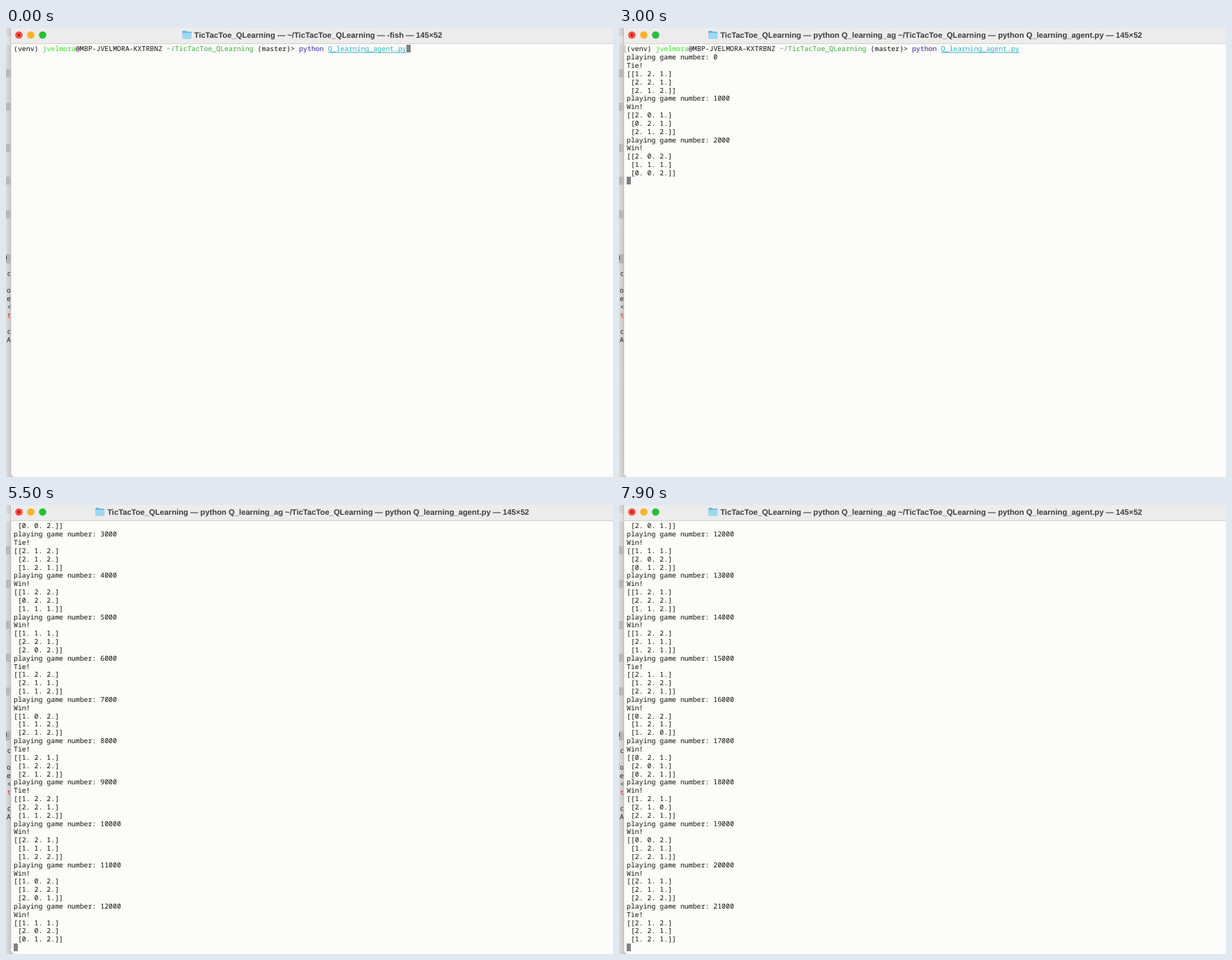
Recreate the animation shown at these times as an HTML page with a canvas. Size 870 px wide and 643 px high, loop 8 s.

```html
<!DOCTYPE html>
<html lang="en">
<head>
<meta charset="utf-8">
<title>Terminal</title>
<style>
  html, body { margin: 0; width: 100%; height: 100%; overflow: hidden; background: #fcfcfb; }
  canvas { display: block; width: 870px; height: 643px; }
</style>
</head>
<body>
<canvas id="stage" width="870" height="643"></canvas>
<script>
const W = 870, H = 643, LOOP = 8000;
const ctx = document.getElementById('stage').getContext('2d');

const MONO = '500 9.877px "Noto Sans Mono", "DejaVu Sans Mono", monospace';
const TITLE = 'bold 11.22px "Liberation Sans", Arial, sans-serif';
const COL = 5.926, ROW = 11.84, LEFT = 11, BASE = 33.3, ROWS = 52;

// Times in ms
const ENTER = 2100, RETITLE = 2200, FIRST_GAME = 2285, GAME_STEP = 260;

const PROMPT = [
  ['(venv) ', '#111'],
  ['jvelmora', '#35e01f'],
  ['@MBP-JVELMORA-KXTRBNZ ', '#111'],
  ['~/TicTacToe_QLearning', '#38ad31'],
  [' (master)> ', '#111'],
  ['python ', '#3a249c'],
  ['Q_learning_agent.py', '#2fb0c0', true]
];
const PROMPT_COLS = PROMPT.reduce((n, [text]) => n + text.length, 0);

const IDLE_TITLE = 'TicTacToe_QLearning — ~/TicTacToe_QLearning — -fish — 145×52';
const BUSY_TITLE = 'TicTacToe_QLearning — python Q_learning_ag ~/TicTacToe_QLearning — python Q_learning_agent.py — 145×52';

// Result letter followed by the three board rows
const GAMES = `T121221212 W201021212 W202111002 T212212121 W122022111 W111221202
  T122211112 W102112212 T121122212 T122221112 W221111122 W102122201 W111202012
  W121222112 W122211121 T211122221 W022121120 W021201021 W121210221 W002121221
  W211211222 T212221121`.split(/\s+/);

const boardRow = digits => '[' + [...digits].map(d => d + '.').join(' ') + ']';

const OUTPUT = GAMES.flatMap((game, i) => [
  'playing game number: ' + i * 1000,
  game[0] === 'T' ? 'Tie!' : 'Win!',
  '[' + boardRow(game.slice(1, 4)),
  ' ' + boardRow(game.slice(4, 7)),
  ' ' + boardRow(game.slice(7)) + ']'
]);

function rect(x, y, w, h, color) {
  ctx.fillStyle = color;
  ctx.fillRect(x, y, w, h);
}

function disc(x, y, r, color) {
  ctx.fillStyle = color;
  ctx.beginPath();
  ctx.arc(x, y, r, 0, 2 * Math.PI);
  ctx.fill();
}

function type(text, x, y, color) {
  ctx.fillStyle = color;
  ctx.fillText(text, x, y);
}

const baseline = row => Math.round(BASE + row * ROW);

function drawBackdrop() {
  const shade = ctx.createLinearGradient(0, 0, 8, 0);
  shade.addColorStop(0, '#dcdcdd');
  shade.addColorStop(1, '#c6c6c8');
  rect(0, 0, 16, H, shade);
  rect(0, 12, 7, 12, 'rgba(255,255,255,.3)');
  for (const y of [59, 107, 166, 213, 261]) rect(0, y, 7, 11.5, '#b9bab6');
  rect(0, 324, 7, 13, '#b4b4b6');

  ctx.font = MONO;
  const scraps = [[')', -3, 328], ['c', 1.5, 351], ['fo', -5, 375], ['le', -5, 387],
    ['<', 1.5, 399], ['t', 1.5, 411], ['c', 1.5, 434], ['RA', -5, 446]];
  for (const [text, x, y] of scraps) type(text, x, y + 3.5, text === 't' ? '#d0361c' : '#222');
}

function drawWindow() {
  ctx.fillStyle = '#fcfcfb';
  ctx.beginPath();
  ctx.moveTo(7, 0);
  ctx.lineTo(7, H - 8);
  ctx.quadraticCurveTo(7, H, 14, H);
  ctx.lineTo(W, H);
  ctx.lineTo(W, 0);
  ctx.fill();
  rect(6.5, 0, 0.7, H - 8, '#b0b0b2');
}

function drawFolder(x, y) {
  ctx.fillStyle = '#67b9da';
  ctx.beginPath();
  ctx.roundRect(x, y, 6, 4, 1);
  ctx.roundRect(x, y + 1.3, 13, 10, 1);
  ctx.fill();
  ctx.fillStyle = '#9bdaf0';
  ctx.beginPath();
  ctx.roundRect(x, y + 3, 13, 8.6, 1);
  ctx.fill();
}

function drawTitleBar(title) {
  rect(7, 0, W - 7, 22, '#ececec');
  rect(7, 22, W - 7, 1, '#d2d2d2');
  disc(18.5, 10, 5.3, '#fc4b46');
  disc(18.5, 10, 1.5, '#7c0f0c');
  disc(35.5, 10, 5.3, '#fdb32a');
  disc(52.5, 10, 5.3, '#27c03a');

  ctx.font = TITLE;
  const left = 447.5 - ctx.measureText(title).width / 2;
  type(title, left, 14, '#3d3d3d');
  drawFolder(left - 17, 4);
}

function drawPrompt(y) {
  let x = LEFT;
  for (const [text, color, underlined] of PROMPT) {
    type(text, x, y, color);
    const width = text.length * COL;
    if (underlined) rect(x, y + 1.5, width, 1, color);
    x += width;
  }
}

function drawCursor(col, row) {
  rect(Math.round(LEFT + col * COL), Math.round(24 + row * ROW), 6, 11, '#828282');
}

function drawMark(y) {
  rect(8, y - 8, 1, 10, '#aaa');
  rect(8, y - 8, 2, 1, '#aaa');
  rect(8, y + 1, 2, 1, '#aaa');
}

function drawTerminal(t) {
  const running = t >= ENTER;
  const games = Math.max(0, Math.floor((t - FIRST_GAME) / GAME_STEP) + 1);
  const lines = Math.min(games * 5, OUTPUT.length);
  const top = Math.max(0, lines + 2 - ROWS);

  ctx.font = MONO;
  if (top === 0) {
    drawPrompt(baseline(0));
    if (running) drawMark(baseline(0));
  }
  for (let i = Math.max(1, top); i <= lines; i++) {
    type(OUTPUT[i - 1], LEFT, baseline(i - top), '#111');
  }

  if (running) drawCursor(0, lines + 1 - top);
  else if (Math.floor((t + 400) / 500) % 2 === 0) drawCursor(PROMPT_COLS, 0);
}

function draw(now) {
  const t = now % LOOP;
  ctx.textRendering = 'geometricPrecision';
  drawBackdrop();
  drawWindow();
  drawTerminal(t);
  drawTitleBar(t < RETITLE ? IDLE_TITLE : BUSY_TITLE);
}

const start = performance.now();
function tick() {
  draw(performance.now() - start);
  requestAnimationFrame(tick);
}
tick();
</script>
</body>
</html>
```
